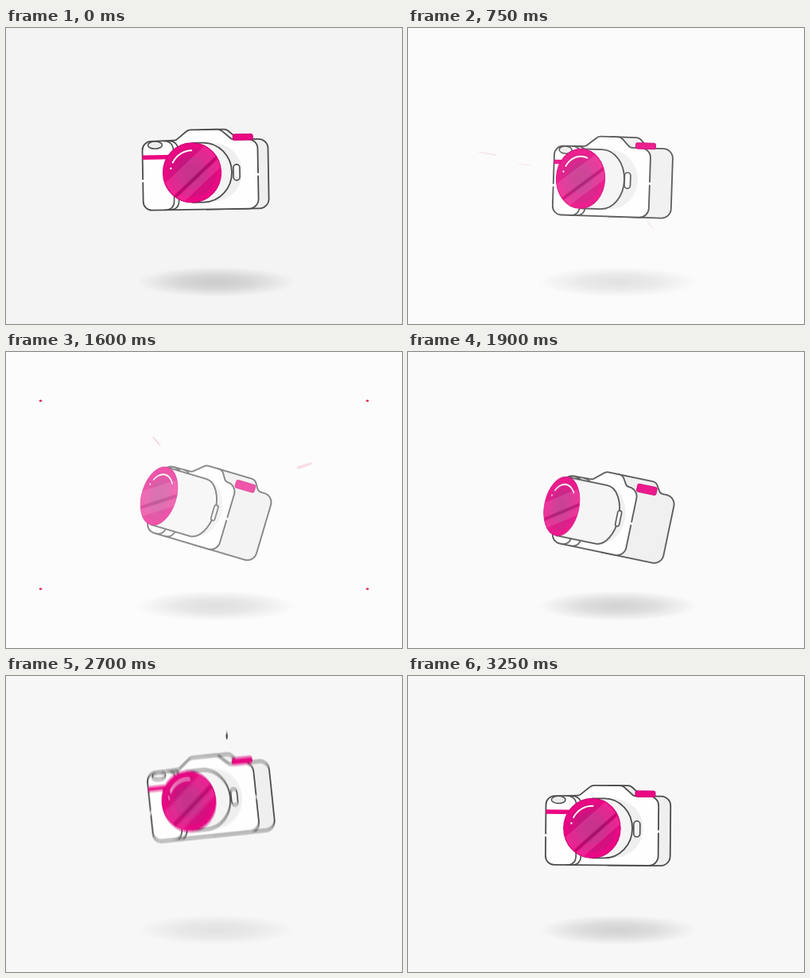
An HTML page with a canvas that plays this animation: 498 px wide and 373 px high, repeating every 3.3 s.

```html
<!DOCTYPE html>
<html lang="en">
<head>
<meta charset="utf-8">
<title>Floating camera</title>
<style>
  html, body { margin: 0; width: 100%; height: 100%; overflow: hidden; background: #f7f7f7; }
  canvas { display: block; width: 498px; height: 373px; }
</style>
</head>
<body>
<canvas id="stage" width="498" height="373"></canvas>
<script>
const W = 498, H = 373, LOOP = 3300, STEP = 50;
const SHUTTER = 28, SAMPLES = 7;
const INK = '#4c4c4c', PINK = '#ea0883';

const stage = document.getElementById('stage').getContext('2d');
const layer = document.createElement('canvas');
layer.width = W;
layer.height = H;
const g = layer.getContext('2d');

// Smooth curve through [time, value] keys; flat at peaks and at both ends.
function track(keys) {
  const slope = (a, b) => (b[1] - a[1]) / (b[0] - a[0]);
  const tangent = keys.map((k, i) => {
    const before = keys[i - 1], after = keys[i + 1];
    if (!before || !after || slope(before, k) * slope(k, after) <= 0) return 0;
    return slope(before, after);
  });
  return t => {
    if (t <= keys[0][0]) return keys[0][1];
    const i = keys.findIndex(k => k[0] > t);
    if (i < 0) return keys[keys.length - 1][1];
    const [t0, a] = keys[i - 1], [t1, b] = keys[i];
    const d = t1 - t0, u = (t - t0) / d, v = 1 - u;
    return a * v * v * (1 + 2 * u) + b * u * u * (3 - 2 * u)
      + d * u * v * (tangent[i - 1] * v - tangent[i] * u);
  };
}

const motion = {
  x: track([[0, 252], [750, 254], [1100, 252], [1600, 250], [2200, 255], [2700, 256.5], [3250, 252]]),
  y: track([[0, 182], [750, 191], [1100, 187], [1600, 198.5], [1950, 207], [2200, 157],
            [2450, 124], [2700, 155], [2900, 197], [3060, 189], [3250, 192]]),
  tilt: track([[0, -1], [750, 1.9], [1100, .5], [1600, 16.5], [2200, 4], [2700, -6], [3000, 1.5], [3250, .5]]),
  turn: track([[0, 0], [750, .44], [1100, .18], [1600, 1], [2200, 1], [2700, .2], [3250, .06]]),
  wash: track([[0, 0], [500, .05], [750, .1], [1100, 0], [1400, .1], [1600, .32], [1950, .05], [2200, 0], [3250, 0]]),
  back: track([[0, 244], [750, 250], [1100, 248], [1600, 251], [2200, 247], [3250, 247]]),
  shade: track([[0, .2], [750, .13], [1100, .17], [1600, .2], [2200, .18], [2450, .09], [2700, .1], [3250, .18]])
};

function paint(fill, width = 1.8, ink = INK) {
  if (fill) { g.fillStyle = fill; g.fill(); }
  if (width) { g.lineWidth = width; g.strokeStyle = ink; g.stroke(); }
}

// Closed polygon with a corner radius per point.
function outline(points) {
  const last = points[points.length - 1], first = points[0];
  g.beginPath();
  g.moveTo((last[0] + first[0]) / 2, (last[1] + first[1]) / 2);
  points.forEach(([x, y, r], i) => {
    const next = points[(i + 1) % points.length];
    g.arcTo(x, y, next[0], next[1], r);
  });
  g.closePath();
}

function oval(x, y, rx, ry, fill, width = 0, ink = INK) {
  g.beginPath();
  g.ellipse(x, y, rx, ry, 0, 0, 7);
  paint(fill, width, ink);
}

function pill(x, y, w, h, r, fill, width = 0, ink = INK) {
  g.beginPath();
  g.roundRect(x, y, w, h, r);
  paint(fill, width, ink);
}

function drawLens(x, rx, turn) {
  g.save();
  g.translate(x, 0);
  g.scale(rx / 38, 1);
  oval(0, 0, 37.5, 37.5, PINK, 1.2, '#d0007a');
  oval(0, 0, 31, 31, '#d60f80');
  oval(0, 0, 20, 20, '#c2187e');
  oval(0, 0, 11, 11, '#b91a7a');
  g.save();
  g.beginPath();
  g.arc(0, 0, 37, 0, 7);
  g.clip();
  g.rotate(-.73 + .35 * turn);
  g.fillStyle = 'rgba(255,150,210,.2)';
  g.fillRect(-60, -14, 120, 19);
  g.fillRect(-60, 10, 120, 10);
  g.fillStyle = 'rgba(110,0,70,.32)';
  g.fillRect(-60, 6, 120, 3);
  g.restore();
  const from = 3.35 + .2 * turn;
  g.lineCap = 'round';
  g.beginPath();
  g.arc(0, 0, 28, from + .28, 4.7 + .8 * turn);
  paint(null, 2, '#fff');
  oval(28 * Math.cos(from), 28 * Math.sin(from), 1.3, 1.3, '#fff');
  g.restore();
}

function drawCamera(turn) {
  // Blend between front, half-turned and fully turned poses.
  const pose = (a, b, c) => turn < .44
    ? a + (b - a) * turn / .44
    : b + (c - b) * (turn - .44) / .56;

  const left = pose(-80, -71, -64), right = pose(65, 50, 30), shift = 73 - right;
  const humpL = pose(-22, -16, -14), humpR = pose(18, 12, 7);
  const footL = pose(-38, -32, -29), footR = pose(33, 24, 15);
  const top = -41, peak = -54, base = 46.5;

  outline([[0, peak, 0], [humpR + shift, peak, 8], [footR + shift, top, 6],
           [78, top, 12], [78, base, 12], [0, base, 0]]);
  paint('#efefef');

  outline([[left, base, 11], [left, top + 1, 11], [footL, top, 6], [humpL, peak, 8],
           [humpR, peak, 8], [footR, top, 6], [right, top, 12], [right, base, 12]]);
  paint('#fefefe');

  oval(pose(8, 1, -8), 0, pose(37, 34, 29), 37, '#efeff0');

  const grip = pose(-41, -37, -40), rim = pose(-35, -30, -28);
  for (const x of [grip, rim]) {
    g.beginPath();
    g.moveTo(x - 12, top + .5);
    g.quadraticCurveTo(x, top + 1, x, top + 13);
    g.lineTo(x, base - 12);
    g.quadraticCurveTo(x, base, x - 12, base);
    paint(null, 1.6);
  }
  oval(pose(-64, -57, -52), -35.5, pose(9, 8, 7), 4.6, '#ececec', 1.5);
  g.fillStyle = PINK;
  g.fillRect(left, -23, grip - left, 5.5);

  g.fillStyle = '#fff';
  g.fillRect(left - 2, 8, 4, 3);
  g.fillRect(right - 2, 2, 4, 3);

  pill(pose(34, 31, 28), -47.5, 25, pose(7.5, 7.5, 10), 2.5, PINK, 1, '#cf0075');

  const lens = pose(-18, -37, -60), lensR = pose(37, 31, 22);
  const mount = pose(-4, -11, -9), mountR = pose(36, 29, 22);
  g.beginPath();
  g.moveTo(lens, -37.5);
  g.lineTo(mount, -37.5);
  g.ellipse(mount, 0, mountR, 37.5, 0, -Math.PI / 2, Math.PI / 2);
  g.lineTo(lens, 37.5);
  paint('#f4f4f5');

  const w = pose(8, 7.5, 5);
  pill(pose(38, 22, 13) - w / 2, -9.5, w, 20, w / 2, '#f6f6f6', 1.6);
  drawLens(lens, lensR, turn);
}

function drawShadow(alpha) {
  g.save();
  g.translate(264, 320);
  g.scale(1, .19);
  const soft = g.createRadialGradient(0, 0, 0, 0, 0, 100);
  soft.addColorStop(0, `rgba(40,40,40,${alpha})`);
  soft.addColorStop(.45, `rgba(40,40,40,${alpha * .72})`);
  soft.addColorStop(1, 'rgba(40,40,40,0)');
  oval(0, 0, 100, 100, soft);
  g.restore();
}

// Specks fly out from the middle and shrink; each is [x, y, size] at the halfway mark.
function drawBurst(t, start, span, specks) {
  const u = (t - start) / span;
  if (u <= 0 || u >= 1) return;
  const reach = (1 - (1 - u) ** 2) / .75;
  for (const [x, y, size] of specks) {
    g.save();
    g.translate(250 + (x - 250) * reach, 185 + (y - 185) * reach);
    g.rotate(.4);
    oval(0, 0, size * 2 * (1 - u), size * 1.3 * (1 - u), '#ee5a9c');
    g.restore();
  }
}

function drawCorners(t) {
  const u = (t - 1450) / 250;
  if (u <= 0 || u >= 1) return;
  for (const x of [43.5, 454.5])
    for (const y of [61.5, 298.5])
      oval(x, y, 1.7 * Math.sin(Math.PI * u) + .2, 1.3, '#d8274f');
}

function drawStreak(y0, y1) {
  if (Math.abs(y1 - y0) < 1) return;
  const mid = (y0 + y1) / 2;
  g.beginPath();
  g.moveTo(277.7, y0);
  g.lineTo(278.7, mid);
  g.lineTo(277.7, y1);
  g.lineTo(276.7, mid);
  g.closePath();
  paint('#444', .7, '#444');
}

function drawStreaks(t) {
  const part = (a, b) => Math.min(1, Math.max(0, (t - a) / (b - a)));
  drawStreak(290 - 54 * part(2100, 2185), 290 - 54 * part(2215, 2330));
  drawStreak(43 + 37 * part(2520, 2640), 43 + 37 * part(2560, 2745));
}

function drawScene(t) {
  const tone = motion.back(t), wash = motion.wash(t);
  g.fillStyle = `rgb(${tone},${tone},${tone})`;
  g.fillRect(0, 0, W, H);
  drawShadow(motion.shade(t));
  drawStreaks(t);
  g.save();
  g.translate(motion.x(t), motion.y(t));
  g.rotate(motion.tilt(t) * Math.PI / 180);
  drawCamera(motion.turn(t));
  g.restore();
  g.fillStyle = `rgba(252,252,252,${wash})`;
  g.fillRect(0, 0, W, H);
  drawBurst(t, 600, 300, [[99, 158, 1.5], [146, 172, 1], [305, 249, 1]]);
  drawBurst(t, 1450, 300, [[189, 112, 1.7], [376, 143, 2.5]]);
  drawCorners(t);
}

// Average several moments around t for motion blur.
function render(t) {
  for (let i = 0; i < SAMPLES; i++) {
    drawScene(t + SHUTTER * (i / (SAMPLES - 1) - .5));
    stage.globalAlpha = 1 / (i + 1);
    stage.drawImage(layer, 0, 0);
  }
}

const begin = performance.now();
let shown = -1;
function tick() {
  const time = Math.max(0, performance.now() - begin) % LOOP;
  const t = Math.floor(time / STEP) * STEP;
  if (t !== shown) render(shown = t);
  requestAnimationFrame(tick);
}
tick();
</script>
</body>
</html>
```
